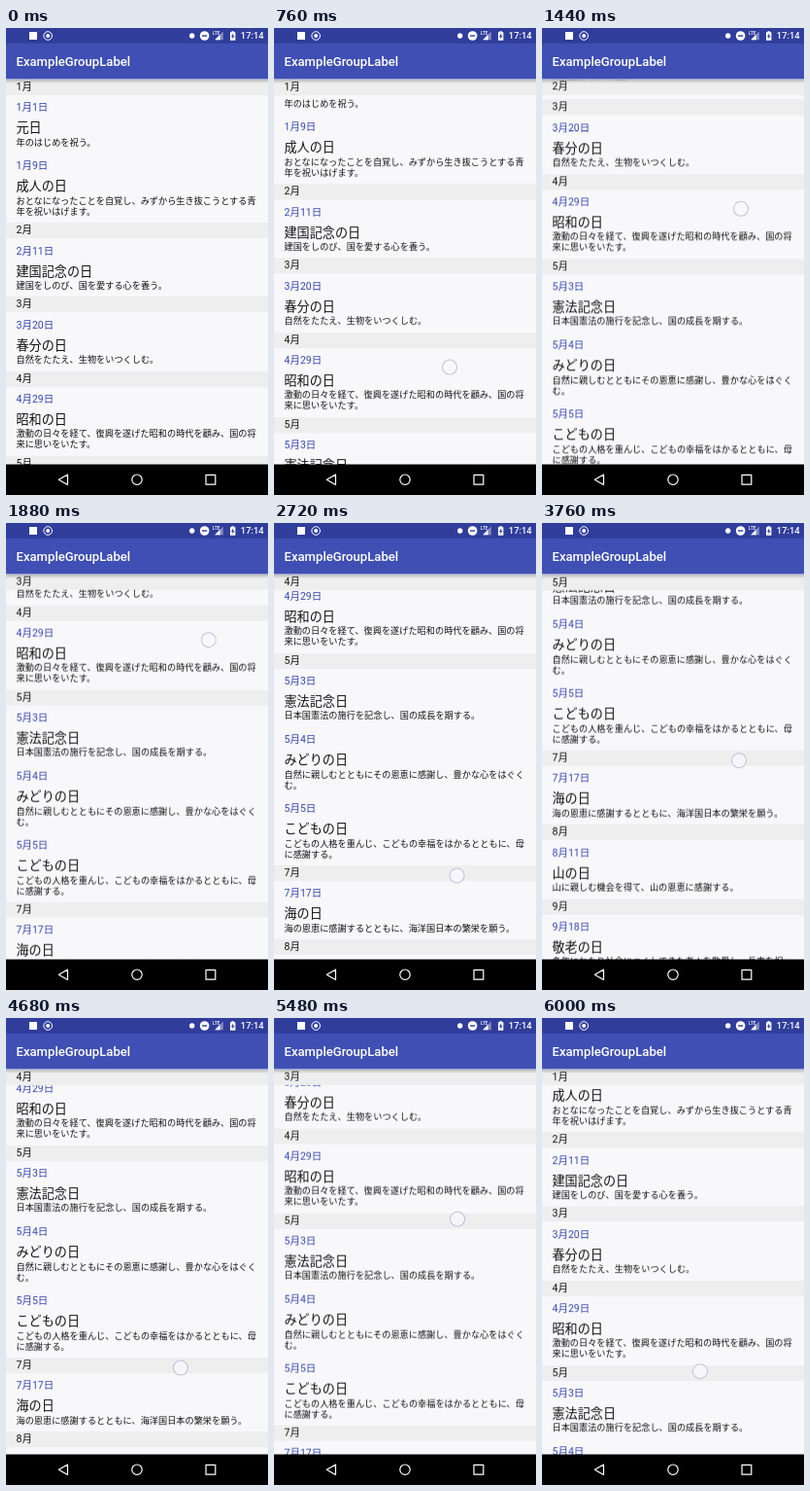
An HTML page for the animation above (6040 ms loop, 270 px wide and 480 px high).

```html
<!DOCTYPE html>
<html lang="ja">
<head>
<meta charset="utf-8">
<title>ExampleGroupLabel</title>
<style>
html, body { margin: 0; width: 100%; height: 100%; overflow: hidden; background: #000; }
#stage {
  position: relative; width: 270px; height: 480px; overflow: hidden;
  font-family: Roboto, "Noto Sans CJK JP", "Noto Sans CJK", sans-serif;
  color: #111; background: #f8f8fa; white-space: pre;
}
#view { position: absolute; top: 53px; width: 270px; height: 395.5px; overflow: hidden; }
#list { position: absolute; top: 0; left: 0; width: 270px; will-change: transform; }
.month {
  position: relative; z-index: 1; height: 16px; padding-left: 10.5px;
  font-size: 10.5px; line-height: 16.6px; background: #eee;
}
.day { box-sizing: border-box; height: 60.2px; padding: 5.3px 0 0 10.5px; }
.day.tall { height: 71.1px; }
.date { font-size: 10.5px; line-height: 16px; color: #3545ad; }
.name { margin-top: 5px; font-size: 13.12px; line-height: 16px; }
.note { margin-top: 1.4px; font-size: 9.19px; line-height: 10.9px; }
#shade {
  position: absolute; top: 52.5px; width: 270px; height: 4px;
  background: linear-gradient(rgba(0,0,0,.22), rgba(0,0,0,0));
}
#chrome { position: absolute; left: 0; top: 0; }
#dot {
  position: absolute; left: -8px; top: -8px; width: 16px; height: 16px;
  box-sizing: border-box; border-radius: 50%; visibility: hidden;
  border: 1px solid rgba(150,150,190,.55); background: rgba(248,248,253,.8);
}
</style>
</head>
<body>
<div id="stage">
  <div id="view"><div id="list"></div></div>
  <div id="shade"></div>
  <svg id="chrome" width="270" height="480" viewBox="0 0 270 480" fill="#fff">
    <rect width="270" height="52.5" fill="#3f4fb3"/>
    <rect width="270" height="15.75" fill="#303d9b"/>
    <rect y="448.5" width="270" height="31.5" fill="#000"/>
    <rect x="24" y="4" width="8" height="8"/>
    <circle cx="43.2" cy="8" r="4.3" fill="none" stroke="#fff"/>
    <circle cx="43.2" cy="8" r="2"/>
    <circle cx="191.7" cy="8" r="2.7"/>
    <circle cx="204.6" cy="8" r="4.8"/>
    <rect x="202" y="7.3" width="5.2" height="1.4" fill="#303d9b"/>
    <text x="213" y="7.2" font-size="4.6" font-weight="500">LTE</text>
    <path d="M223.8 3.6V12.2H215.2Z" opacity=".4"/>
    <path d="M220.6 6.8V12.2H215.2Z"/>
    <path d="M231 4.2h1.5V3.2h2.4v1h1.5v8.6H231Z"/>
    <path d="M234.2 5.3 232 9h1.4v2.6l2.1-3.7h-1.3Z" fill="#303d9b"/>
    <text x="241.8" y="11.4" font-size="9.4" font-weight="500">17:14</text>
    <text x="10.5" y="39.2" font-size="13.12" font-weight="500">ExampleGroupLabel</text>
    <g fill="none" stroke="#fff" stroke-width="1.2" stroke-linejoin="round">
      <path d="M54.3 464.2 63.5 459V469.4Z"/>
      <circle cx="135" cy="464.2" r="5.2"/>
      <rect x="206" y="459.4" width="9.8" height="9.8"/>
    </g>
  </svg>
  <div id="dot"></div>
</div>
<script>
const LOOP = 6040, HEAD = 16;

const months = [
  ['1月', ['1日', '元日', '年のはじめを祝う。'],
    ['9日', '成人の日', 'おとなになったことを自覚し、みずから生き抜こうとする青\n年を祝いはげます。']],
  ['2月', ['11日', '建国記念の日', '建国をしのび、国を愛する心を養う。']],
  ['3月', ['20日', '春分の日', '自然をたたえ、生物をいつくしむ。']],
  ['4月', ['29日', '昭和の日', '激動の日々を経て、復興を遂げた昭和の時代を顧み、国の将\n来に思いをいたす。']],
  ['5月', ['3日', '憲法記念日', '日本国憲法の施行を記念し、国の成長を期する。'],
    ['4日', 'みどりの日', '自然に親しむとともにその恩恵に感謝し、豊かな心をはぐく\nむ。'],
    ['5日', 'こどもの日', 'こどもの人格を重んじ、こどもの幸福をはかるとともに、母\nに感謝する。']],
  ['7月', ['17日', '海の日', '海の恩恵に感謝するとともに、海洋国日本の繁栄を願う。']],
  ['8月', ['11日', '山の日', '山に親しむ機会を得て、山の恩恵に感謝する。']],
  ['9月', ['18日', '敬老の日', '多年にわたり社会につくしてきた老人を敬愛し、長寿を祝\nう。']]
];

// Rows: time, scroll offset
const scrollKeys = [
  [0, 0], [540, 0], [760, 39.7], [1100, 125], [1440, 202.5], [1840, 265],
  [2200, 285], [2520, 285], [2720, 306], [3240, 370], [3760, 424.3], [3930, 431],
  [4300, 373], [4680, 309], [5060, 283], [5300, 283], [5640, 180], [6000, 83], [6040, 78]
];

// Each touch: visible from, until, finger y + scroll, then rows of time, x
const touches = [
  [400, 2040, 388.5, [[400, 178], [760, 181], [1440, 205], [2040, 210]]],
  [2520, 5050, 668.5, [[2520, 185], [2720, 188.5], [3760, 203], [4680, 180], [5050, 177]]],
  [5310, 6040, 446, [[5310, 195], [5640, 183], [6000, 163], [6040, 162]]]
];

const list = document.getElementById('list');
const dot = document.getElementById('dot');

function add(parent, cls, text = '') {
  const el = document.createElement('div');
  el.className = cls;
  el.textContent = text;
  return parent.appendChild(el);
}

const heads = [];
let listY = 0;
for (const [month, ...days] of months) {
  heads.push({ el: add(list, 'month', month), y: listY });
  listY += HEAD;
  for (const [date, name, note] of days) {
    const tall = note.includes('\n');
    const day = add(list, tall ? 'day tall' : 'day');
    add(day, 'date', month + date);
    add(day, 'name', name);
    add(day, 'note', note);
    listY += tall ? 71.1 : 60.2;
  }
}

// Smooth curve through the keys that never overshoots
function curve(keys, t) {
  const last = keys.length - 1;
  if (t <= keys[0][0]) return keys[0][1];
  if (t >= keys[last][0]) return keys[last][1];
  let i = 0;
  while (t >= keys[i + 1][0]) i++;
  const rate = k => (keys[k + 1][1] - keys[k][1]) / (keys[k + 1][0] - keys[k][0]);
  const slope = k => {
    if (k === 0) return rate(0);
    if (k === last) return rate(last - 1);
    const a = rate(k - 1), b = rate(k);
    return a * b <= 0 ? 0 : 2 * a * b / (a + b);
  };
  const [t0, v0] = keys[i], [t1, v1] = keys[i + 1];
  const d = t1 - t0, p = (t - t0) / d, q = 1 - p;
  return q * q * (1 + 2 * p) * v0 + p * p * (3 - 2 * p) * v1
    + d * p * q * (q * slope(i) - p * slope(i + 1));
}

function draw() {
  const t = performance.now() % LOOP;
  const scroll = curve(scrollKeys, t);
  list.style.transform = `translateY(${-scroll}px)`;
  heads.forEach((head, i) => {
    // The pinned month is pushed away by the next one
    const limit = i + 1 < heads.length ? heads[i + 1].y - HEAD : Infinity;
    const shift = Math.max(0, Math.min(scroll, limit) - head.y);
    head.el.style.transform = `translateY(${shift}px)`;
  });
  const touch = touches.find(([from, to]) => t >= from && t < to);
  dot.style.visibility = touch ? 'visible' : 'hidden';
  if (touch) dot.style.transform = `translate(${curve(touch[3], t)}px, ${touch[2] - scroll}px)`;
  requestAnimationFrame(draw);
}
draw();
</script>
</body>
</html>
```
